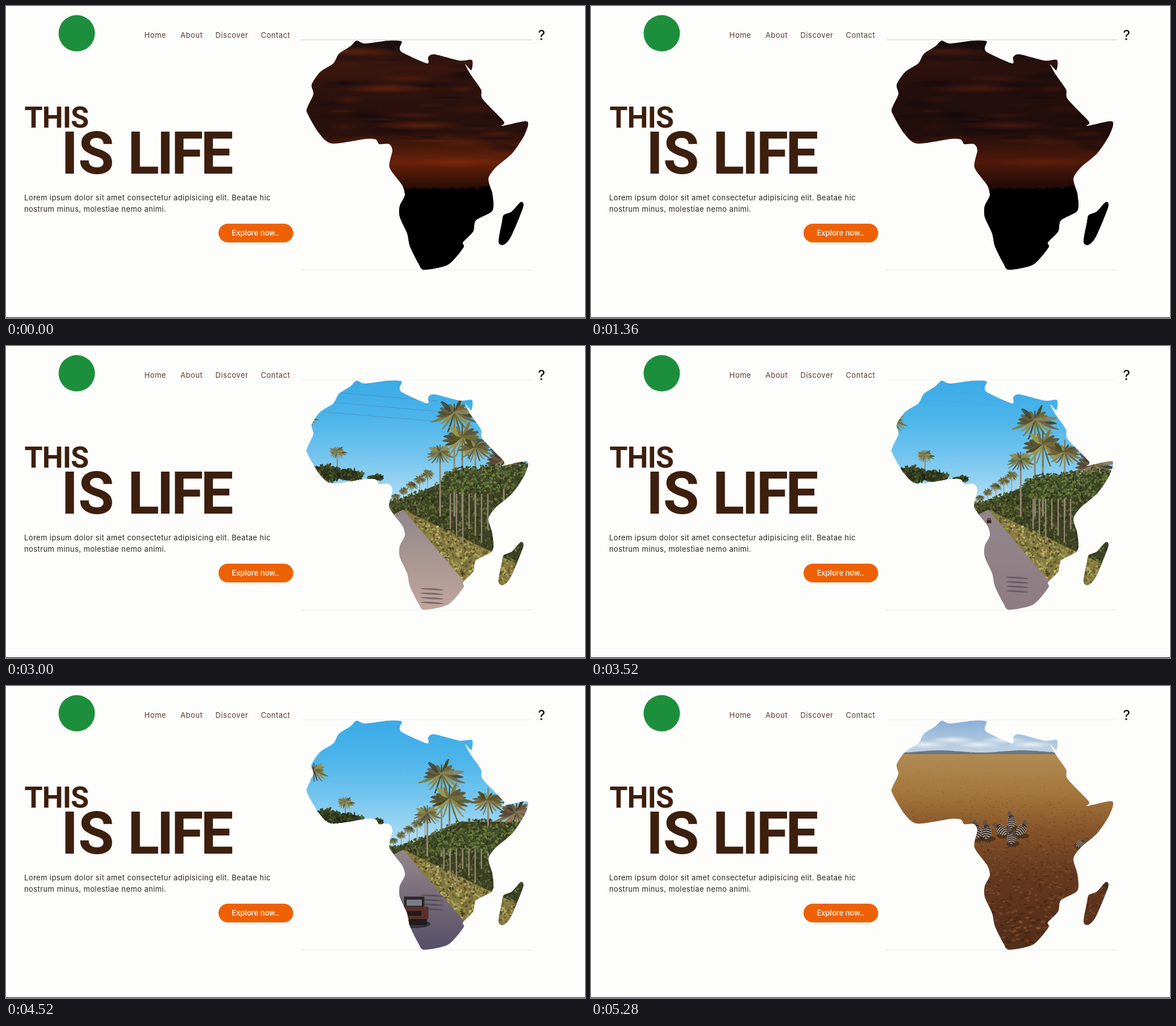
An HTML page with a canvas that plays this animation: 1019 by 549 pixels, repeating every 5320 ms.

```html
<!DOCTYPE html>
<html lang="en">
<head>
<meta charset="utf-8">
<title>This is life</title>
<style>
  html, body { margin: 0; width: 100%; height: 100%; overflow: hidden; background: #fdfdfc; }
  canvas, svg { position: absolute; left: 0; top: 0; width: 1019px; height: 549px; }
  text { font-family: Inter, "Open Sans", sans-serif; font-size: 13px; fill: #2b2422; letter-spacing: .4px; }
  .nav text { fill: #573a2a; letter-spacing: .5px; }
  .head text { font-family: Roboto, "Liberation Sans", sans-serif; font-weight: 700; fill: #3d1f0e; }
  .this { font-size: 52px; letter-spacing: -.9px; }
  .big { font-size: 103px; letter-spacing: 0; }
  .life { font-size: 103px; letter-spacing: -4.6px; }
  .cta { fill: #fff; font-weight: 500; letter-spacing: 0; }
  .help { font-size: 24px; font-weight: 500; fill: #111; letter-spacing: 0; }
  .rule { stroke: #9a9a9a; stroke-dasharray: 1 1; }
</style>
</head>
<body>
<canvas id="stage" width="1019" height="549"></canvas>
<svg viewBox="0 0 1019 549">
  <circle cx="124.5" cy="48" r="32" fill="#1d8f3c"/>
  <g class="nav">
    <text x="243.5" y="56">Home</text>
    <text x="307" y="56">About</text>
    <text x="368.5" y="56">Discover</text>
    <text x="448.5" y="56">Contact</text>
  </g>
  <text class="help" x="942.5" y="59.5" text-anchor="middle">?</text>
  <line id="topRule" class="rule" x1="521" y1="59.5" x2="926" y2="59.5"/>
  <line class="rule" x1="520" y1="464.5" x2="928" y2="464.5" opacity=".35"/>
  <g class="head">
    <text class="this" x="32.5" y="214">THIS</text>
    <text class="big" x="97" y="295">IS</text>
    <text class="life" x="214" y="295">LIFE</text>
  </g>
  <text x="32" y="342">Lorem ipsum dolor sit amet consectetur adipisicing elit. Beatae hic</text>
  <text x="32" y="361.5">nostrum minus, molestiae nemo animi.</text>
  <rect x="374" y="383" width="131.5" height="33" rx="16.5" fill="#ee6102"/>
  <text class="cta" x="397.5" y="404">Explore now..</text>
  <rect y="548" width="1019" height="1" fill="#111"/>
</svg>
<script>
const LOOP = 5320, ROAD = 2600, PLAIN = 4680;
const LEFT = 520, RIGHT = 930, TOP = 55, BOTTOM = 470;
const ctx = document.getElementById('stage').getContext('2d');
const topRule = document.getElementById('topRule');
const TAU = Math.PI * 2;
const mix = (a, b, p) => a + (b - a) * p;
const clamp = p => Math.min(1, Math.max(0, p));

function random(seed) {
  return () => {
    seed = (seed * 1664525 + 1013904223) >>> 0;
    return seed / 4294967296;
  };
}

// Smooth closed outline through "x,y" points
function outline(path, text) {
  const pts = text.trim().split(/\s+/).map(s => s.split(',').map(Number));
  const at = i => pts[(i + pts.length) % pts.length], k = .13;
  path.moveTo(...pts[0]);
  pts.forEach((a, i) => {
    const z = at(i - 1), b = at(i + 1), c = at(i + 2);
    path.bezierCurveTo(a[0] + (b[0] - z[0]) * k, a[1] + (b[1] - z[1]) * k,
      b[0] - (c[0] - a[0]) * k, b[1] - (c[1] - a[1]) * k, b[0], b[1]);
  });
  path.closePath();
}

const land = new Path2D();
outline(land, `617,61 632,66 672,61 696,62 693,73 698,82 741,101 743,90 754,85 798,96
  820,95 819,113 808,102 818,121 836,147 839,164 876,203 873,211 917,203 913,226 891,259
  862,284 849,304 856,331 856,360 827,377 822,397 804,416 805,425 778,455 736,464 726,453
  711,423 706,400 693,371 693,352 702,333 697,315 675,284 680,254 674,243 657,243 651,235
  632,234 574,242 551,224 530,188 531,177 541,155 538,138 553,116 576,101 586,84 606,71`);
outline(land, '906,345 910,354 889,405 876,420 867,415 873,380 876,368 890,362');

// Vertical gradient over the picture, colours evenly spaced
function ramp(top, bottom, ...colors) {
  const g = ctx.createLinearGradient(0, top, 0, bottom);
  colors.forEach((c, i) => g.addColorStop(i / (colors.length - 1), c));
  ctx.fillStyle = g;
  ctx.fillRect(LEFT, top, RIGHT - LEFT, BOTTOM - top);
}

function oval(x, y, rx, ry, color, turn = 0) {
  ctx.fillStyle = color;
  ctx.beginPath();
  ctx.ellipse(x, y, rx, ry, turn, 0, TAU);
  ctx.fill();
}

// Soft-edged oval; rgb is "r,g,b"
function haze(x, y, rx, ry, rgb, alpha) {
  ctx.save();
  ctx.translate(x, y);
  ctx.scale(rx, ry);
  const g = ctx.createRadialGradient(0, 0, 0, 0, 0, 1);
  g.addColorStop(0, `rgba(${rgb},${alpha})`);
  g.addColorStop(1, `rgba(${rgb},0)`);
  ctx.fillStyle = g;
  ctx.fillRect(-1, -1, 2, 2);
  ctx.restore();
}

function sunset(t) {
  const rnd = random(17), drift = t * .006;
  ramp(TOP, 330, '#170d10', '#38160d', '#2b110d', '#28100c', '#682109', '#1a0805');
  for (let i = 0; i < 60; i++) {
    const x = mix(530, RIGHT, rnd()) + drift, y = mix(65, 265, rnd());
    haze(x, y, 25 + rnd() * 50, 3 + rnd() * 8, i % 2 ? '105,36,12' : '14,9,15', .2 + rnd() * .4);
  }
  for (let i = 0; i < 4; i++)
    haze(605 + i * 62 + drift, 80 + i * 65, 85, 9, '140,48,13', .5);
  ctx.fillStyle = `rgba(10,6,12,${clamp(t / 4000) * .75})`;
  ctx.fillRect(LEFT, TOP, RIGHT - LEFT, BOTTOM);
  ctx.fillStyle = '#000';
  ctx.fillRect(LEFT, 326, RIGHT - LEFT, BOTTOM);
  for (let x = 690; x < 865; x += 3)
    oval(x, 327, 2 + rnd() * 4, 2 + rnd() * (x > 800 ? 9 : 6), '#000');
}

// Leaves scattered by place(u, v) => [x, y]
function leaves(n, seed, hue, light, place) {
  const rnd = random(seed);
  for (let i = 0; i < n; i++) {
    const [x, y] = place(rnd(), rnd());
    oval(x, y, 1.2 + rnd() * 2.2, .8 + rnd() * 1.5,
      `hsl(${hue + rnd() * 25},${25 + rnd() * 15}%,${light * (.5 + rnd())}%)`, rnd() * 3);
  }
}

function crown(x, y, rx, ry, seed, light) {
  oval(x, y, rx * .9, ry * .8, `hsl(75,28%,${light * .8}%)`);
  leaves(rx * ry / 3, seed, 65, light, (u, v) => {
    const d = Math.sqrt(v);
    return [x + Math.cos(u * TAU) * rx * d, y + Math.sin(u * TAU) * ry * d];
  });
}

function trunk(x, top, bottom, w) {
  ctx.fillStyle = '#948671';
  ctx.fillRect(x - w / 2, top, w, bottom - top);
}

function palm(x, y, r, hue = 65) {
  const rnd = random(Math.round(r * 97));
  for (let i = 0; i < 20; i++) {
    const a = i / 20 * TAU, len = r * (.7 + rnd() * .4);
    const dx = Math.cos(a) * len, dy = Math.sin(a) * len * .8;
    ctx.strokeStyle = `hsl(${hue - rnd() * 22},${18 + rnd() * 20}%,${20 + rnd() * 28}%)`;
    ctx.lineWidth = r * .045 + .4;
    ctx.beginPath();
    for (let u = 0; u < 1; u += .08) {
      const px = x + dx * u, py = y + dy * u + r * .3 * u * u - r * .15 * u;
      ctx.moveTo(px - dx * .08, py);
      ctx.lineTo(px + dx * .08, py + r * .22 * Math.sin(u * 3));
    }
    ctx.stroke();
  }
}

// Ground between two slopes (dx per dy) spreading from the vanishing point
function fan(from, to, fill) {
  const x = 699, y = 288, h = BOTTOM - y;
  ctx.fillStyle = fill;
  ctx.beginPath();
  ctx.moveTo(x, y);
  ctx.lineTo(x + from * h, BOTTOM);
  ctx.lineTo(x + to * h, BOTTOM);
  ctx.fill();
}

function car(x, y, s) {
  ctx.save();
  ctx.translate(x, y);
  ctx.scale(s, s);
  oval(0, 14, 16, 4, 'rgba(30,22,28,.6)');
  const box = (color, w, top, h) => {
    ctx.fillStyle = color;
    ctx.fillRect(-w / 2, top, w, h);
  };
  box('#302526', 20, -13, 12);
  box('#77808a', 15, -10, 6);
  box('#201b1d', 25, 6, 9);
  box('#5c302a', 28, -3, 12);
  box('#201b1d', 14, 1, 5);
  ctx.restore();
}

function road(t) {
  const p = (t - 3000) / 1080, dx = -16 * p, dy = 26 * p;
  ramp(TOP, 265, '#3aaae6', '#4bb4ea', '#74c5ee', '#aadaf3');

  ctx.strokeStyle = `rgba(90,120,175,${clamp(.6 - p)})`;
  ctx.beginPath();
  for (let y = 80; y < 120; y += 18) {
    ctx.moveTo(560, y - p * 50);
    ctx.lineTo(760, y + 17 - p * 50);
  }
  ctx.stroke();

  palm(525 + 12 * p, 120 + 20 * p, 24);
  palm(583 + 10 * p, 185 + 13 * p, 16);
  trunk(583 + 10 * p, 188 + 13 * p, 230, 2);
  for (let i = 0; i < 3; i++)
    crown(562 + i * 44, 224 + i * 4 + dy * .2, 34 - i * 9, 16 - i * 5, 12 + i, 19);

  // Row of far palms, rising towards the viewer
  for (let i = 0; i < 5; i++) {
    const x = 686 + i * 14 + dx * .2, y = 264 - i * 10 + dy * .2;
    trunk(x, y, 290, 1);
    palm(x, y, 8 + i);
  }

  const edge = x => 290 + Math.max(0, x - 699) / 2.1;
  const roof = x => mix(270, 222, clamp((x - 690) / 110)) + dy * .35;
  ctx.fillStyle = '#3c4124';
  ctx.beginPath();
  for (let x = 670; x <= RIGHT; x += 10) ctx.lineTo(x, roof(x) + 4);
  ctx.lineTo(RIGHT, BOTTOM);
  ctx.lineTo(670, 295);
  ctx.fill();
  leaves(1300, 41, 60, 24, (u, v) => {
    const x = mix(672, RIGHT, u);
    return [x, mix(roof(x), edge(x), v)];
  });
  fan(.8, 2.1, '#8b7a3f');
  leaves(900, 44, 42, 40, (u, v) => {
    const h = Math.sqrt(v) * 140;
    return [699 + mix(.85, 2.1, u) * h, 288 + h];
  });

  // Near palms: [x, y, radius]; the last two pass on the right
  [[764, 186, 24], [789, 117, 38], [803, 160, 40], [826, 178, 30], [876, 200, 38]]
    .forEach(([x, y, r], i) => {
      const px = x + (i > 2 ? -dx : dx), py = y + dy * (i > 2 ? .6 : 1);
      trunk(px, py, 300, 3);
      palm(px, py, r, i > 3 ? 48 : 65);
    });
  for (let i = 0; i < 3; i++)
    crown(812 + i * 44 + dx, 236 - i * 4 + dy, 46, 24, 60 + i, 27);
  for (let i = 0; i < 7; i++)
    trunk(782 + i * 11 + dx / 2, 260 + dy * .7, 322 + i % 3 * 12, 2.4);

  const dusk = clamp(p);
  const g = ctx.createLinearGradient(0, 290, 0, 460);
  g.addColorStop(0, '#91878a');
  g.addColorStop(1, `rgb(${mix(192, 88, dusk)},${mix(165, 80, dusk)},${mix(155, 104, dusk)})`);
  fan(-2, .85, g);
  for (let i = 0; i < 4; i++)
    oval(750, 428 + i * 8 - p * 42, 20, 1.6, 'rgba(65,52,62,.5)', .06);

  if (p > .08) {
    const s = Math.pow(p, 1.7);
    car(697 + 12 * s, 290 + 58 * s, s);
  }
}

function zebra(x, y, s, turn) {
  ctx.save();
  ctx.translate(x, y);
  ctx.scale(s, s);
  oval(3, 12, 13, 5, 'rgba(40,22,14,.5)');
  ctx.rotate(turn);
  ctx.fillStyle = '#42372f';
  for (let a = -6; a < 8; a += 4) ctx.fillRect(a, 6, 2, 13);
  oval(0, 0, 9, 12, '#a89a8c');
  oval(-3, -14, 4, 7, '#5f5249', -.3);
  ctx.strokeStyle = '#2b2422';
  ctx.lineWidth = 1.8;
  ctx.beginPath();
  for (let a = -10; a <= 10; a += 4) {
    const w = 8.6 * Math.sqrt(1 - a * a / 150);
    ctx.moveTo(-w, a + 1);
    ctx.quadraticCurveTo(0, a - 4, w, a + 1);
  }
  ctx.stroke();
  ctx.restore();
}

function plain(t) {
  const p = (t - 4960) / 320, rnd = random(91);
  ramp(TOP, 125, '#86abd5', '#a6c2de', '#cbd9e2');
  for (let i = 0; i < 5; i++)
    haze(590 + i * 46, 103 - i % 2 * 8, 42, 7, '246,248,248', .8);
  for (let x = LEFT; x < RIGHT; x += 4)
    oval(x, 120, 5, 5 + 2 * Math.sin(x / 23), '#6a7781');
  ramp(120, BOTTOM, '#b08b52', '#a4763d', '#835129', '#66391f', '#5a321c', '#532e19');
  for (let i = 0; i < 2200; i++) {
    const d = rnd(), y = mix(124, BOTTOM, d), size = .5 + d * 2.2, w = RIGHT - LEFT;
    const x = LEFT + (rnd() * w - p * (2 + d * 12) + w) % w;
    const a = .12 + d * .24;
    oval(x, y, size * 1.5, size * .7,
      i % 2 ? `rgba(45,24,14,${a})` : `rgba(178,119,65,${a * .8})`, rnd() - .5);
  }
  // Two at the left, four in a ring
  for (let i = 0; i < 2; i++) zebra(690 + i * 18 - 12 * p, 257, 1, .05);
  for (let i = 3; i >= 0; i--) {
    const a = i * TAU / 4;
    zebra(753 + 17 * Math.cos(a) - 13 * p, 253 + 14 * Math.sin(a), .9, .7 * Math.cos(a));
  }
  zebra(884 - 23 * p, 277, .65, 1);
  haze(908, 352, 9, 13, '35,47,34', .85);
}

const start = performance.now();
function draw(now) {
  const t = Math.max(0, now - start) % LOOP;
  ctx.clearRect(0, 0, 1019, 549);
  ctx.save();
  ctx.clip(land);
  (t < ROAD ? sunset : t < PLAIN ? road : plain)(t);
  ctx.restore();
  topRule.setAttribute('opacity', t < ROAD ? .9 : .2);
  requestAnimationFrame(draw);
}
draw(start);
</script>
</body>
</html>
```
